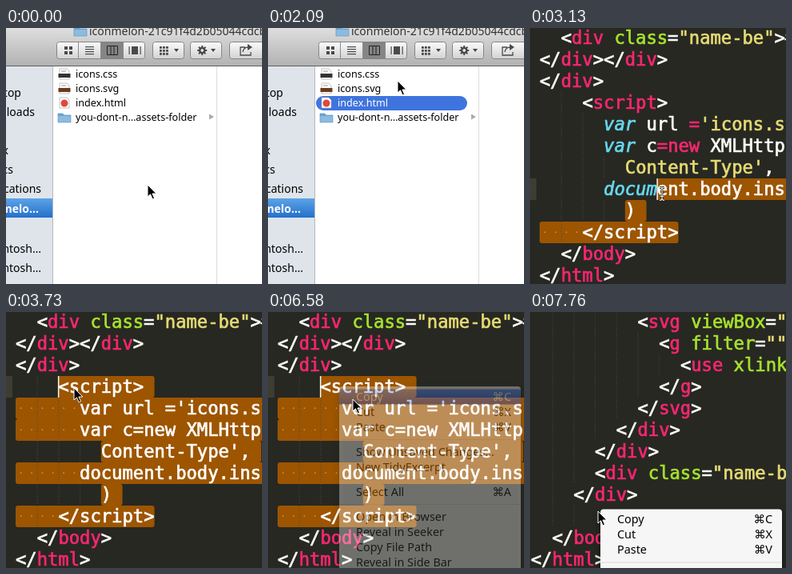
Animation, 320 px wide and 320 px high, one loop 8 s. Source, as an HTML page:

```html
<!DOCTYPE html>
<html lang="en">
<meta charset="utf-8">
<title>Copying a script block</title>
<style>
html, body { margin: 0; height: 100%; overflow: hidden; background: #272822 }
svg { display: block; width: 100vw; height: 100vh }
text { font: 14px "Noto Sans", "DejaVu Sans", sans-serif; white-space: pre }
.files text { font-size: 12.6px }
.menu text { font-size: 14.4px }
.code text { font: 22.17px "DejaVu Sans Mono", monospace; fill: currentColor; stroke-width: .7px }
.w { fill: #fdfdf8; stroke: #fdfdf8 }
.p { fill: #f92672; stroke: #f92672 }
.g { fill: #a6e22e; stroke: #a6e22e }
.y { fill: #e6db74; stroke: #e6db74 }
.c, .i { fill: #66d9ef; stroke: #66d9ef }
.i { font-style: italic }
#picked tspan { fill: #fff; stroke: #fff; font-style: normal }
.menu { filter: drop-shadow(0 4px 5px #0007) }
</style>
<svg id="stage" viewBox="0 0 320 320"></svg>
<script>
const CW = 13.35, LH = 27, LEFT = 12;
const $ = id => document.getElementById(id);
const rect = (x, y, w, h, fill, more = '') =>
  `<rect x="${x}" y="${y}" width="${w}" height="${h}" fill="${fill}" ${more}/>`;
const path = (d, fill, more = '') => `<path d="${d}" fill="${fill}" ${more}/>`;
const text = (x, y, s, more = '') => `<text x="${x}" y="${y}" ${more}>${s}</text>`;
const fade = (id, ...stops) => `<linearGradient id="${id}" x2="0" y2="1">` +
  stops.map((c, i) => `<stop offset="${i / (stops.length - 1)}" stop-color="${c}"/>`).join('') + '</linearGradient>';

// Code rows: [indent, segments, soft wrapped]; the first letter of a segment is its colour class
const shut = tag => `w</|p${tag}|w>`;
const page = [
  [2, 'w<|pdiv|w |gclass|w=|y"name-be"|w>#'],
  [0, shut('div') + '|' + shut('div')],
  [0, shut('div')],
  [4, 'w<|pscript|w>'],
  [6, "ivar|w url |p=|y'icons.svg'"],
  [6, 'ivar|w c|p=new|w XMLHttpRequest'],
  [8, "yContent-Type'|w,", true],
  [6, 'idocument|w.|cbody|w.|cinsert'],
  [8, 'w)', true],
  [4, shut('script')],
  [2, shut('body')],
  [0, shut('html')]
];
const target = [
  [10, 'w<|psvg|w |gviewBox|w=|y"0 0'],
  [12, 'w<|pg|w |gfilter|w=|y""'],
  [14, 'w<|puse|w |gxlink'],
  [12, shut('g')],
  [10, shut('svg')],
  [8, shut('div')],
  [6, shut('div')],
  [6, 'w<|pdiv|w |gclass|w=|y"name-be"'],
  [4, shut('div')],
  [6, ''],
  [2, shut('body')],
  [0, shut('html')]
];
const rowEnd = ([indent, s]) => indent + s.split('|').reduce((n, part) => n + part.length - 1, 0);

function code(rows, left) {
  return rows.map(([indent, s], r) => {
    let out = '';
    for (let c = 2; c < indent; c += 2)
      out += path(`M${left + c * CW + .5} ${r * LH - 1}v${LH}`, 'none', 'stroke="#4b4a42" stroke-dasharray="1 2"');
    const parts = s && s.split('|').map(p =>
      `<tspan class="${p[0]}">${p.slice(1).replace(/</g, '&lt;')}</tspan>`).join('');
    return out + text(left + indent * CW, r * LH + 20, parts);
  }).join('');
}

const spaceDots = () => page.map(([indent], r) =>
  Array.from({ length: indent }, (_, c) =>
    rect(LEFT + (c + .5) * CW - .7, r * LH + 11.5, 1.5, 1.5, '#d19a5c')).join('')).join('');

// Items are "label|shortcut"; an empty string is a separator
function menu(id, x, top, w, items, hl) {
  let y = top + 17.5, out = rect(x, top, w, 340, '#fafafa', 'rx="4" fill-opacity=".985"');
  const tx = x + 21;
  items.forEach((item, i) => {
    if (!item) {
      out += rect(x + 1, y - 8.5, w - 2, 1, '#dcdcdc');
      y += 12;
      return;
    }
    const [label, key = ''] = item.split('|');
    const line = fill => text(tx, y, label, `fill="${fill}"`) +
      text(x + w - 12, y, key, `fill="${fill}" text-anchor="end"`);
    out += line('#000');
    if (!i) out += `<g id="${hl}">${rect(x, y - 14, w, 19, 'url(#blue)')}${line('#fff')}</g>`;
    y += 19;
  });
  return `<g id="${id}" class="menu">${out}</g>`;
}

function button(x, w) {
  return rect(x + .5, 17.5, w, 21, 'url(#button)', 'rx="3" stroke="#858585"');
}
const drop = x => path(`M${x} 26h6l-3 4z`, '#444');
const cells = (x, y, cols, rows, step, size) => {
  let out = '';
  for (let i = 0; i < cols * rows; i++)
    out += rect(x + i % cols * step, y + Math.floor(i / cols) * step, size, size, '#4a4a4a');
  return out;
};
const folder = (x, y) => path(`M${x} ${y + 1}h6l1.5 2h8.5v9h-16z`, '#6ba3cf', 'stroke="#5d8fbd" stroke-width=".6"') +
  rect(x + .4, y + 4, 15.2, 7.6, '#8cbbe0');
const sheet = (y, tint) => path(`M67 ${y}h9l3 3v10h-12z`, '#fff', 'stroke="#aaa" stroke-width=".7"') +
  rect(65.5, y + 6, 15, 5, tint) + rect(69, y + 2.5, 6, 1, '#999');

function fileWindow() {
  const side = [[19, 86, 'ktop'], [36, 110, 'wnloads'], [3, 158, 'x'], [9, 182, 'cs'],
    [44, 206, 'ications'], [44, 281, 'intosh…'], [44, 305, 'intosh…']];
  let gear = '';
  for (let i = 0; i < 8; i++) gear += rect(244.2, 22, 2, 4, '#4a4a4a', `transform="rotate(${i * 45} 245.2 28)"`);
  return rect(0, 0, 320, 320, '#fff') +
    rect(0, 0, 320, 47, 'url(#chrome)') + rect(0, 47, 320, 1, '#606060') +
    folder(85, -2) + text(104, 9, 'iconmelon-21c91f4d2b05044cdcb9', 'fill="#333"') +
    button(63, 110) + rect(118, 18, 28, 21, '#858585') +
    [90, 118, 146].map(x => rect(x, 18, 1, 21, '#8a8a8a')).join('') +
    cells(73, 23, 2, 2, 6, 4) +
    [23, 26, 29, 32].map(y => rect(99, y, 11, 1.2, '#4a4a4a')).join('') +
    path('M126.500 22.500h13v11h-13zM131 22v12M135 22v12', 'none', 'stroke="#222"') +
    rect(157, 23, 8, 10, '#4a4a4a') + rect(153.5, 23, 1.2, 10, '#4a4a4a') + rect(167.5, 23, 1.2, 10, '#4a4a4a') +
    button(183, 39) + cells(192, 23, 3, 3, 4, 2.8) + drop(210) +
    button(230, 39) + gear + '<circle cx="245.2" cy="28" r="3.2" fill="none" stroke="#4a4a4a" stroke-width="2.2"/>' + drop(256) +
    button(279, 50) +
    path('M299 24h-6v10h13v-4M296 30q1-6 7-6', 'none', 'stroke="#4a4a4a" stroke-width="1.3"') + path('M302 20l6 4-6 4z', '#4a4a4a') +
    rect(0, 48, 58, 272, '#dee4ea') + rect(58, 48, 1, 272, '#b5b8bc') +
    side.map(([x, y, s]) => text(x, y, s, 'text-anchor="end"')).join('') +
    rect(0, 213, 58, 24, 'url(#side)') +
    text(41, 231, 'nmelo…', 'text-anchor="end" fill="#fff" style="font-weight:bold"') +
    rect(263, 48, 1, 272, '#dcdcdc') +
    '<g class="files">' +
    `<g id="chosen">${rect(60, 85, 189, 18, '#3f74de', 'rx="9"')}</g>` +
    sheet(51, '#333') + sheet(69, '#6b3a1c') +
    path('M67 87h9l3 3v10h-12z', '#fff', 'stroke="#aaa" stroke-width=".7"') + '<circle cx="73" cy="94" r="4.5" fill="#dc4a3d"/>' +
    folder(65, 106) +
    text(87, 62, 'icons.css') + text(87, 80, 'icons.svg') + text(87, 98, 'index.html', 'id="name"') +
    text(87, 116, 'you-dont-n…assets-folder') +
    path('M254 107.500l6 3.500-6 3.500z', '#aaa') + '</g>';
}

$('stage').innerHTML = '<defs>' +
  fade('chrome', '#dedede', '#b2b2b2') + fade('button', '#fbfbfb', '#d2d2d2') +
  fade('blue', '#5e8cf8', '#1c50e8') + fade('side', '#5da3e6', '#2470cc') +
  '<clipPath id="area"></clipPath></defs>' +
  `<g id="files">${fileWindow()}</g>` +
  `<g id="editor" class="code">${rect(0, 0, 320, 320, '#272822')}${rect(0, 0, 8, LH, '#3e3d32', 'id="gutter"')}` +
  code(page, LEFT) +
  `<g id="picked" clip-path="url(#area)">${rect(0, 0, 320, 320, '#9d5500')}${spaceDots()}${code(page, LEFT)}</g>` +
  rect(0, 0, 1.5, LH, '#f8f8f0', 'id="caret"') + '</g>' +
  `<g id="paste" class="code">${rect(0, 0, 320, 320, '#272822')}${code(target, 1)}</g>` +
  menu('fileMenu', 150, 46, 200, ['Open', 'Open With', '', 'Move to Trash', '', 'Get Info',
    'Compress “index.html”', 'Burn “index.html” to Disc…', 'Duplicate', 'Make Alias',
    'Quick Look “index.html”', 'Share', '', 'Copy “index.html”', '', 'Show View Options'], 'openHl') +
  menu('codeMenu', 89, 93, 227, ['Copy|⌘C', 'Cut|⌘X', 'Paste|⌘V', '', 'Show Unsaved Changes…',
    'New TidyExcerpt', '', 'Select All|⌘A', '', 'Open in Browser', 'Reveal in Seeker',
    'Copy File Path', 'Reveal in Side Bar'], 'copyHl') +
  path('M0 0v15l3.500-3.200 2.600 6 2.400-1.100-2.600-5.700h4.900z', '#000', 'id="arrow" stroke="#fff"') +
  `<g id="beam" fill="none">${['#111|2.6', '#eee|1.2'].map(s => {
    const [c, w] = s.split('|');
    return path('M-3-8q3 0 3 2v12q0 2-3 2M3-8q-3 0-3 2v12q0 2 3 2M-2 3h4', 'none', `stroke="${c}" stroke-width="${w}"`);
  }).join('')}</g>`;

// Pointer steps: time, x, y, and 1 for the text beam
const moves = [
  [0, 177, 196], [300, 169, 165], [450, 156, 124], [600, 142, 91], [1200, 148, 80], [1350, 162, 66],
  [2240, 238, 290, 1], [2540, 225, 274, 1], [2690, 215, 262, 1],
  [3730, 85, 95], [3880, 88, 96], [4180, 95, 98], [4330, 100, 101], [6580, 106, 109],
  [7180, 150, 212, 1], [7330, 125, 228, 1], [7480, 100, 244, 1], [7620, 85, 249]
];
const show = (id, on) => $(id).setAttribute('display', on ? 'inline' : 'none');
const place = (id, x, y) => $(id).setAttribute('transform', `translate(${x} ${y})`);

function draw(t) {
  const within = (a, b) => t >= a && t < b;
  show('files', t < 2240);
  show('chosen', t >= 750);
  $('name').setAttribute('fill', t >= 750 ? '#fff' : '#000');
  show('fileMenu', within(1200, 2090));
  show('openHl', t >= 1350);
  $('fileMenu').setAttribute('opacity', t >= 1950 ? .35 : 1);

  // Drag upwards, one row per step
  let [, x, y, beam] = moves.findLast(m => m[0] <= t);
  const step = Math.max(0, Math.min(6, Math.floor((t - 2690) / 148)));
  if (within(2690, 3730)) {
    x += (65 - x) * step / 6;
    y += (98 - y) * step / 6;
  }
  const row = t < 2690 ? 1 : 9 - step;
  const end = rowEnd(page[row]);
  const start = step === 6 ? 4 :
    step ? Math.max(page[row][0], Math.min(end, Math.round((x - LEFT) / CW))) : end;
  show('editor', within(2240, 7180));
  place('gutter', 0, row * LH - 1);
  place('caret', LEFT + start * CW - .5, row * LH - 1);
  let area = '';
  for (let r = row; step && r < 10; r++) {
    const [indent, , wrapped] = page[r];
    const from = r === row ? start : wrapped ? indent : 0;
    const to = rowEnd(page[r]) + (r < 9 ? 1 : 0);
    area += rect(LEFT + from * CW, r * LH - 1, (to - from) * CW, LH, '#000', 'rx="3"');
  }
  $('area').innerHTML = area;

  show('paste', t >= 7180);
  show('codeMenu', within(3880, 6730) || t >= 7760);
  show('copyHl', within(4330, 6730));
  $('codeMenu').setAttribute('opacity', within(6580, 6730) ? .35 : 1);
  place('codeMenu', t > 7000 ? -1 : 0, t > 7000 ? 153.5 : 0);

  show('arrow', !beam);
  show('beam', beam);
  place(beam ? 'beam' : 'arrow', x, y);
}

function tick() {
  draw(performance.now() % 8000);
  requestAnimationFrame(tick);
}
tick();
</script>
</html>
```
